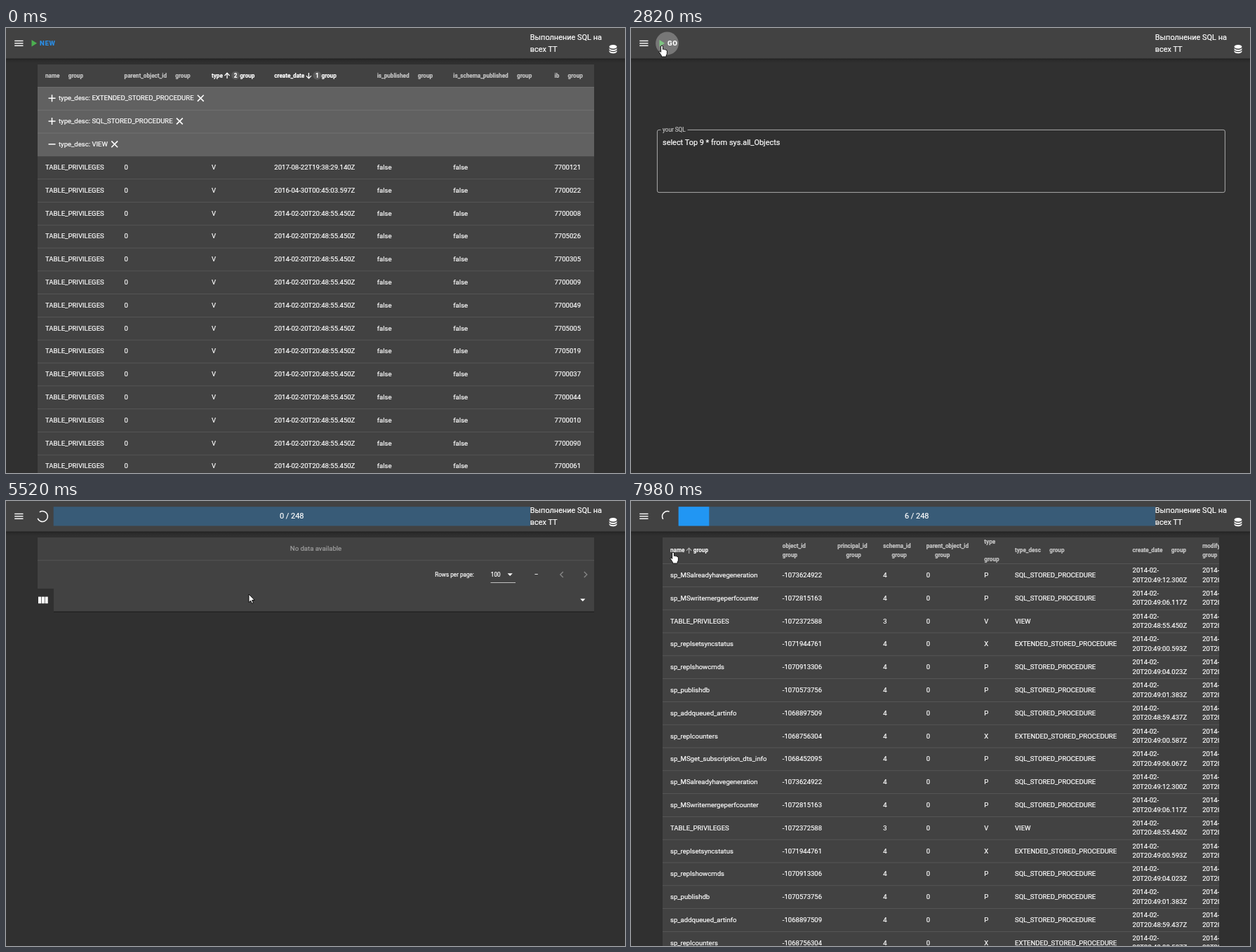
An HTML page that plays this animation: 882 by 635 pixels, repeating every 8 s.

```html
<!DOCTYPE html>
<html lang="ru">
<head>
<meta charset="utf-8">
<title>SQL runner</title>
<style>
html, body { margin: 0; width: 100%; height: 100%; overflow: hidden; background: #303030; }
svg { display: block; position: absolute; left: 0; top: 0; font-family: Roboto, sans-serif; }
text { stroke-width: .2px; white-space: pre; }
</style>
</head>
<body>
<svg id="stage" width="882" height="635" viewBox="0 0 882 635">
  <defs>
    <clipPath id="card"><rect x="45" y="52" width="793" height="583"/></clipPath>
    <linearGradient id="shade" x2="0" y2="1">
      <stop offset="0" stop-color="#000" stop-opacity=".34"/>
      <stop offset=".5" stop-color="#000" stop-opacity=".1"/>
      <stop offset="1" stop-color="#000" stop-opacity="0"/>
    </linearGradient>
  </defs>
</svg>
<script>
const LOOP = 8000, STEP = 60;
const ENTER_AT = 960, NEW_AT = 2700, FORM_AT = 2760, FOCUS_AT = 4020, GO_AT = 4740, LOAD_AT = 4920, DATA_AT = 5940;
const WHITE = '#fff', MUTED = '#c4c4c4', CARD = '#424242', RAISED = '#616161', BLUE = '#2196f3';
const BODY = 9.56, SMALL = 8.17, LARGE = 10.93, ROW = 32.8;
const stage = document.getElementById('stage');

function el(parent, tag, attrs = {}, content) {
  const node = document.createElementNS('http://www.w3.org/2000/svg', tag);
  set(node, attrs);
  if (content !== undefined) node.textContent = content;
  return parent.appendChild(node);
}
function set(node, attrs) {
  for (const k in attrs) node.setAttribute(k, attrs[k]);
}
const show = (node, on) => { node.style.display = on ? '' : 'none'; };
const clamp = v => Math.min(1, Math.max(0, v));
const group = (parent, attrs) => el(parent, 'g', attrs);
const rect = (parent, x, y, width, height, fill) => el(parent, 'rect', { x, y, width, height, fill });
const path = (parent, d, attrs) => el(parent, 'path', { d, ...attrs });
const line = (parent, d, stroke, width) =>
  path(parent, d, { fill: 'none', stroke, 'stroke-width': width });
// y is the optical middle of the line
const text = (parent, x, y, str, size = BODY, fill = WHITE, more = {}) =>
  el(parent, 'text', { x, y: y + size * .355, 'font-size': size, fill, stroke: fill, ...more }, str);
const divider = (parent, y) => rect(parent, 45, y, 793, .8, 'rgba(255,255,255,.13)');
const caretDown = (parent, x, y) => path(parent, `M${x - 3.6} ${y - 1.7}h7.2l-3.6 3.6z`, { fill: WHITE });
const bold = { 'font-weight': 700, 'stroke-width': 0 };
const centered = { 'text-anchor': 'middle' };

function sortArrow(parent, x, y, down) {
  const s = down ? -1 : 1;
  return line(parent, `M${x} ${y + 4 * s}V${y - 3.6 * s}M${x - 3.6} ${y}L${x} ${y - 3.8 * s}L${x + 3.6} ${y}`, WHITE, 1.3);
}

// One column head; the arrow and "group" follow the label and wrap in narrow columns.
function heading(parent, mid, bottom, x, name, { badge, down, wrap } = {}) {
  const color = badge ? WHITE : MUTED;
  const dy = { group: 6.5, arrow: 6.2, all: 12.7 }[wrap] || 0;
  const label = text(parent, x, mid - dy, name, SMALL, color, bold);
  const end = x + label.getComputedTextLength();
  const arrowX = wrap === 'arrow' || wrap === 'all' ? x + 6 : end + 6.2;
  const arrowY = mid + .4 + { group: -dy, arrow: dy }[wrap] * 1 || mid + .4;
  const groupX = !wrap ? end + (badge ? 24.3 : 12.3) : wrap === 'arrow' ? x + 12.3 : x;
  const labels = [label, text(parent, groupX, mid + dy, 'group', SMALL, color, bold)];
  const arrow = sortArrow(parent, arrowX, arrowY, down);
  if (badge) {
    el(parent, 'circle', { cx: arrowX + 12, cy: mid, r: 6, fill: '#5c5c5c' });
    text(parent, arrowX + 12, mid, badge, SMALL, WHITE, { ...bold, ...centered });
  }
  return { x, left: x - 11.3, bottom, labels, arrow, badge };
}

// grouped result table
const grouped = group(stage, { 'clip-path': 'url(#card)' });
rect(grouped, 45, 52, 793, 583, CARD);
rect(grouped, 45, 84.2, 793, ROW * 3, RAISED);
const groupedCells = [
  [56, 'name'], [168.6, 'parent_object_id'], [293, 'type', { badge: 2 }], [382.3, 'create_date', { badge: 1, down: true }],
  [528.7, 'is_published'], [637.3, 'is_schema_published'], [781.5, 'ib'],
].map(spec => heading(grouped, 67.7, 84, ...spec));
['EXTENDED_STORED_PROCEDURE', 'SQL_STORED_PROCEDURE', 'VIEW'].forEach((kind, i) => {
  const y = 100.2 + ROW * i;
  line(grouped, `M60.5 ${y}h10` + (i < 2 ? 'm-5 -5v10' : ''), WHITE, 1.5);
  const title = text(grouped, 75, y - .3, 'type_desc: ' + kind);
  const x = 84.7 + title.getComputedTextLength();
  line(grouped, `M${x - 4.4} ${y - 4.4}l8.8 8.8m0 -8.8l-8.8 8.8`, WHITE, 1.6);
  divider(grouped, 84 + ROW * i);
});
'0121 0022 0008 5026 0305 0009 0049 5005 5019 0037 0044 0010 0090 0061'.split(' ').forEach((id, i) => {
  const date = ['2017-08-22T19:38:29.140Z', '2016-04-30T00:45:03.597Z'][i] || '2014-02-20T20:48:55.450Z';
  const row = ['TABLE_PRIVILEGES', '0', 'V', date, 'false', 'false', '770' + id];
  row.forEach((str, c) => text(grouped, groupedCells[c].x, 198.6 + ROW * i, str));
  divider(grouped, 182.4 + ROW * i);
});

// query form
const form = group(stage);
const logo = group(form);
rect(logo, 379, 61, 126, 67, '#333');
el(logo, 'circle', { cx: 449, cy: 85, r: 16, fill: '#d9782d' });
const logoFont = { 'font-family': '"Open Sans", sans-serif', 'stroke-width': 0 };
text(logo, 408.5, 104.5, 'Halvorent', 5, '#d9582d', logoFont);
text(logo, 408, 113.5, 'DBM Lorven', 11.6, WHITE, logoFont);
const outline = el(form, 'rect', { rx: 2.5, fill: 'none' });
rect(form, 42.5, 143, 38, 5, '#303030');
const label = text(form, 45, 145.2, 'your SQL', SMALL);
text(form, 45, 163.5, 'select Top 9 * from sys.all_Objects', LARGE);
const hint = text(form, 45, 243.2, 'Paste your T-SQL query => Push GO => Your query will executes on 233 instances!', SMALL, '#b4b4b4');
const caret = rect(form, 212.2, 157, 1, 13, WHITE);

// empty table while loading
const empty = group(stage);
rect(empty, 45, 52, 793, 73, CARD);
rect(empty, 68, 157, 770, 2, 'rgba(0,0,0,.3)');
rect(empty, 68, 124.5, 770, 33, CARD);
divider(empty, 84.4);
text(empty, 441.5, 67.8, 'No data available', BODY, '#a0a0a0', centered);
text(empty, 611.2, 105, 'Rows per page:', SMALL);
text(empty, 690.8, 105, '100', SMALL);
caretDown(empty, 718.2, 105);
rect(empty, 690.5, 116, 35.5, .9, '#d0d0d0');
text(empty, 753, 105, '–', SMALL);
line(empty, 'M793.8 101l-4 4l4 4M823.8 101l4 4l-4 4', '#858585', 1.4);
for (let i = 0; i < 3; i++) rect(empty, 46 + i * 4.8, 136.6, 4.1, 9.6, WHITE);
caretDown(empty, 821.8, 141.3);

// live result table
const live = group(stage, { 'clip-path': 'url(#card)' });
rect(live, 45, 52, 793, 583, CARD);
const rowHover = rect(live, 45, 0, 793, ROW, RAISED);
const liveCells = [
  [56, 'name'], [215.8, 'object_id', { wrap: 'group' }], [294.3, 'principal_id', { wrap: 'arrow' }],
  [359.3, 'schema_id', { wrap: 'arrow' }], [420.7, 'parent_object_id', { wrap: 'arrow' }], [503.3, 'type', { wrap: 'all' }],
  [547, 'type_desc'], [714.6, 'create_date'], [814.2, 'modify_date', { wrap: 'group' }],
].map(spec => heading(live, 70.5, 89.5, ...spec));
const kinds = { P: 'SQL_STORED_PROCEDURE', V: 'VIEW', X: 'EXTENDED_STORED_PROCEDURE' };
const objects = `sp_MSalreadyhavegeneration -1073624922 P 49:12.300
sp_MSwritemergeperfcounter -1072815163 P 49:06.117
TABLE_PRIVILEGES -1072372588 V 48:55.450
sp_replsetsyncstatus -1071944761 X 49:00.593
sp_replshowcmds -1070913306 P 49:04.023
sp_publishdb -1070573756 P 49:01.383
sp_addqueued_artinfo -1068897509 P 48:59.437
sp_replcounters -1068756304 X 49:00.587
sp_MSget_subscription_dts_info -1068452095 P 49:06.067`.split('\n').map(row => row.split(' '));
for (let i = 0; i < 17; i++) {
  const [name, id, kind, time] = objects[i % objects.length], y = 105.7 + ROW * i;
  const row = [name, id, '', kind === 'V' ? 3 : 4, 0, kind, kinds[kind]];
  row.forEach((str, c) => text(live, liveCells[c].x, y, str));
  for (const { x } of liveCells.slice(-2)) {
    text(live, x, y - 7.1, '2014-02-');
    text(live, x, y + 6.5, `20T20:${time}Z`);
  }
  divider(live, 89.2 + ROW * i);
}

// toolbar
const bar = group(stage);
rect(bar, 0, 43, 882, 7, 'url(#shade)');
rect(bar, 0, 0, 882, 43.5, CARD);
for (let i = 0; i < 3; i++) rect(bar, 12.2, 17.7 + i * 3.42, 12.3, 1.4, WHITE);
text(bar, 746.8, 13.4, 'Выполнение SQL на', LARGE);
text(bar, 746.8, 29.8, 'всех ТТ', LARGE);
path(bar, 'M12 3C7.6 3 4 4.8 4 7s3.6 4 8 4 8-1.8 8-4-3.6-4-8-4M4 9v3c0 2.2 3.6 4 8 4s8-1.8 8-4V9c0 2.2-3.6 4-8 4s-8-1.8-8-4M4 14v3c0 2.2 3.6 4 8 4s8-1.8 8-4v-3c0 2.2-3.6 4-8 4s-8-1.8-8-4Z',
  { fill: WHITE, transform: 'translate(856.8 22) scale(.683)' });

function button(x, name, fill) {
  const g = group(bar);
  path(g, `M${x} 17.1v9.5l7.6 -4.75z`, { fill: '#4caf50' });
  text(g, x + 11.4, 22, name, BODY, fill, { ...bold, 'letter-spacing': .8 });
  return g;
}
const newButton = button(36.5, 'NEW', '#2a8ee6');
const goButton = button(40.5, 'GO', WHITE);
const ripple = el(bar, 'circle', { cx: 51.5, cy: 22, r: 16.4, fill: WHITE });
const progress = group(bar);
rect(progress, 67.7, 8.2, 679.3, 27.3, '#385b77');
const fill = rect(progress, 67.7, 8.2, 0, 27.3, BLUE);
const counter = text(progress, 407.2, 21.6, '', LARGE, WHITE, centered);
const spinner = line(progress, '', WHITE, 1.5);

// pointer shapes, hot spot at 0,0
const pointer = group(stage);
const ink = { fill: WHITE, stroke: '#000', 'stroke-width': .9, 'stroke-linejoin': 'round' };
const shapes = {
  arrow: path(pointer, 'M0 0V11.6L2.7 9.2L4.5 13.3L6.4 12.5L4.6 8.5H8.2Z', ink),
  hand: path(pointer, 'M-1.4 .9Q0 -.8 1.4 .9V5.5Q2.6 4.6 3.6 5.8Q5 5 5.8 6.4Q7.4 6 7.4 8V11Q7.4 12.5 6.2 14V16H-.6V14.4L-3.8 9.6Q-4.4 8 -2.8 8L-1.4 9.4Z', ink),
  beam: line(pointer, 'M-2.5 -6H2.5M0 -6V6M-2.5 6H2.5', WHITE, 1),
};

// pointer stops: [time, x, y]
const route = [
  [ENTER_AT, 866, 49], [1740, 300, 107], [2160, 113, 66], [2400, 46, 11], [2520, 44, 25], [3120, 44, 25],
  [3960, 300, 185], [4320, 55, 25], [LOAD_AT, 55, 25], [5520, 346, 133], [6420, 346, 133], [6660, 314, 84], [7980, 60, 73],
];

function pointerAt(t) {
  const next = Math.max(1, route.findIndex(stop => stop[0] >= t));
  const [t0, x0, y0] = route[next - 1], [t1, x1, y1] = route[next];
  const k = clamp((t - t0) / (t1 - t0));
  return [x0 + (x1 - x0) * k, y0 + (y1 - y0) * k];
}

// button overlay: hover tint plus a short press ripple
function glow(t) {
  const age = t - (t < GO_AT ? NEW_AT : GO_AT);
  if (age < 0) return 0;
  return .1 * clamp((540 - age) / 180) + .18 * Math.min(clamp(age / 60), clamp((360 - age) / 180));
}

function drawHeader(cells, t, from) {
  let any = false;
  cells.forEach((cell, i) => {
    const right = i + 1 < cells.length ? cells[i + 1].left : 838;
    const hit = time => {
      const [x, y] = pointerAt(time);
      return time >= from && x >= cell.left && x < right && y >= 52 && y < cell.bottom;
    };
    let age = 0;
    while (age < 6 && hit(t - age * STEP)) age++;
    any = any || age > 0;
    if (cell.badge) return;
    for (const l of cell.labels) set(l, { fill: age ? WHITE : MUTED });
    set(cell.arrow, { opacity: .1 * Math.max(0, age - .6) });
  });
  return any;
}

function drawSpinner(t) {
  const turn = (t - LOAD_AT + 44) / 1400 % 1;
  const start = turn * 360 + 70, sweep = 285 * Math.sin(Math.PI * turn) ** 1.5;
  const at = deg => {
    const a = deg * Math.PI / 180;
    return `${52 + 7.4 * Math.cos(a)} ${22 + 7.4 * Math.sin(a)}`;
  };
  set(spinner, { d: `M${at(start)}A7.4 7.4 0 ${sweep > 180 ? 1 : 0} 1 ${at(start + sweep)}` });
}

function drawForm(t) {
  const on = t >= FOCUS_AT, inset = on ? .9 : .4, color = on ? '#42a5f5' : MUTED;
  set(logo, { opacity: clamp((t - 2940) / 300) });
  set(outline, {
    x: 37 + inset, y: 145 + inset, width: 809.8 - 2 * inset, height: 90 - 2 * inset,
    stroke: on ? WHITE : '#b8b8b8', 'stroke-width': on ? 1.6 : .9,
  });
  set(label, { fill: color, stroke: color });
  set(hint, { opacity: clamp((t - FOCUS_AT + STEP) / 240) });
  show(caret, on && (t - FOCUS_AT) % 1080 < 540);
}

function draw(t) {
  const isForm = t >= FORM_AT && t < LOAD_AT, isLoad = t >= LOAD_AT, isLive = t >= DATA_AT;
  show(grouped, t < FORM_AT);
  show(newButton, t < FORM_AT);
  show(form, isForm);
  show(goButton, isForm);
  show(progress, isLoad);
  show(empty, isLoad && !isLive);
  show(live, isLive);
  show(pointer, t >= ENTER_AT);

  const [x, y] = pointerAt(t);
  let shape = !isLoad && Math.hypot(x - 51.5, y - 22) < 17 ? 'hand' : 'arrow';
  set(ripple, { 'fill-opacity': isLoad ? 0 : glow(t) });

  if (t < FORM_AT && drawHeader(groupedCells, t, ENTER_AT)) shape = 'hand';
  if (isForm) {
    drawForm(t);
    if (x > 38 && y > 146 && y < 234) shape = 'beam';
  }
  if (isLoad) {
    set(fill, { width: 43.6 * clamp((t - DATA_AT + STEP) / 240) });
    counter.textContent = `${isLive ? 6 : 0} / 248`;
    drawSpinner(t);
  }
  if (isLive) {
    if (drawHeader(liveCells, t, DATA_AT)) shape = 'hand';
    const row = Math.floor((y - 89.5) / ROW);
    show(rowHover, row >= 0);
    set(rowHover, { y: 89.5 + ROW * row });
  }

  set(pointer, { transform: `translate(${x} ${y})` });
  for (const s in shapes) show(shapes[s], s === shape);
}

const origin = performance.now();
function tick() {
  const t = (performance.now() - origin) % LOOP;
  draw(Math.floor(t / STEP) * STEP);
  requestAnimationFrame(tick);
}
draw(0);
requestAnimationFrame(tick);
</script>
</body>
</html>
```
